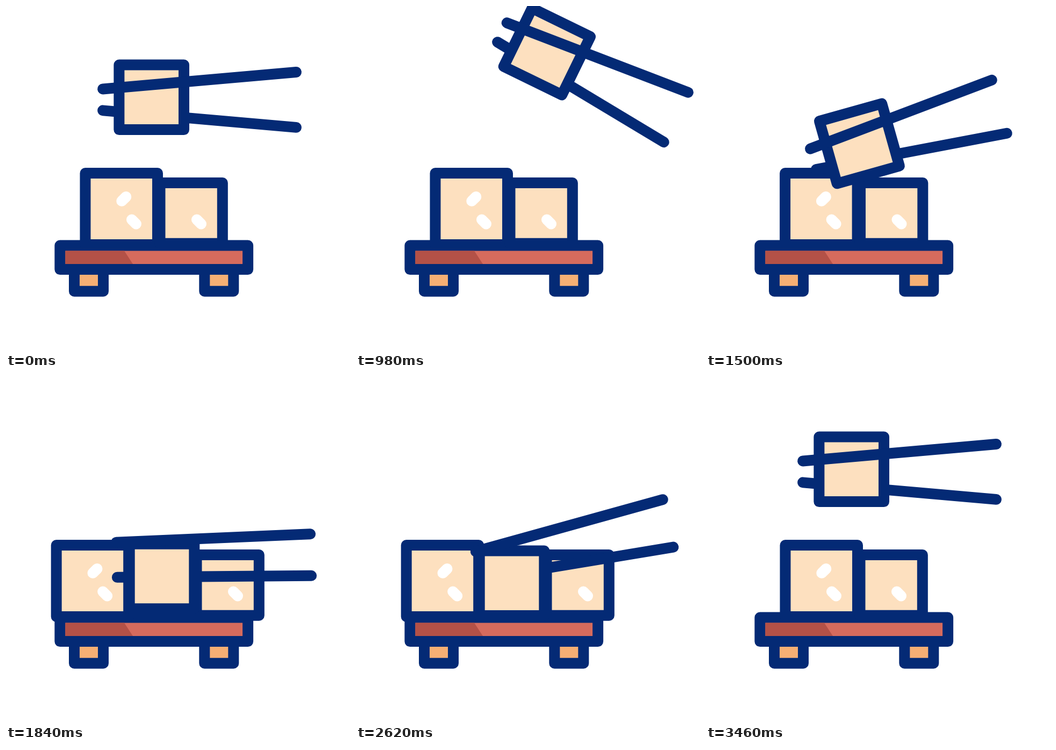
Recreate the animation shown at these times as an HTML page with a canvas. Size 640x640 px, loop 3.6 s.

```html
<!DOCTYPE html>
<html lang="en">
<head>
<meta charset="utf-8">
<title>Tofu and chopsticks</title>
<style>
  html, body { margin: 0; width: 100%; height: 100%; overflow: hidden; background: #fff; }
  canvas { display: block; width: 640px; height: 640px; }
</style>
</head>
<body>
<canvas id="stage" width="640" height="640"></canvas>
<script>
const ctx = document.getElementById('stage').getContext('2d');
const LOOP = 3600;
const NAVY = '#042a75', CREAM = '#fde0bf', RED = '#d66b5d', DARK_RED = '#b45147', ORANGE = '#f6af74';

const rad = deg => deg * Math.PI / 180;
const mix = (a, b, p) => a + (b - a) * p;
const mixPose = (a, b, p) => a.map((v, i) => mix(v, b[i], p));
const progress = (t, from, to) => Math.min(1, Math.max(0, (t - from) / (to - from)));
const ease = (t, from, to) => {
  const u = progress(t, from, to);
  return u * u * (3 - 2 * u);
};

// Key poses of the chopstick pair: centre and tilt.
const path = [
  { at: 0, pose: [360, 174.4, 0] },
  { at: 540, pose: [381, 171.4, 11.2] },
  { at: 980, pose: [433.6, 128.1, 26] },
  { at: 1500, pose: [372.6, 235.8, -15.75] },
  { at: 1740, pose: [378, 360, -8] },
  { at: 2220, pose: [432.4, 129, 25] },
  { at: 2620, pose: [404.5, 308.9, -12.4] },
  { at: 2700, pose: [411, 338, -16] },
  { at: 3060, pose: [378.8, 257.8, -8.5] },
  { at: 3460, pose: [360, 174.4, 0] }
];

// Slope at a key: flat at turning points and ends, smooth in between.
function slope(i, k) {
  const prev = path[i - 1], here = path[i], next = path[i + 1];
  if (!prev || !next) return 0;
  const a = (here.pose[k] - prev.pose[k]) / (here.at - prev.at);
  const b = (next.pose[k] - here.pose[k]) / (next.at - here.at);
  return a * b <= 0 ? 0 : 2 * a * b / (a + b);
}

function sticksPose(t) {
  const end = path.findIndex(key => key.at > t);
  if (end < 0) return path[0].pose;
  const from = path[end - 1], to = path[end];
  const span = to.at - from.at, u = (t - from.at) / span, v = 1 - u;
  return from.pose.map((value, k) =>
    mix(value, to.pose[k], u * u * (3 - 2 * u))
    + span * u * v * (slope(end - 1, k) * v - slope(end, k) * u));
}

const opening = t => 12 * (ease(t, 1740, 2000) - ease(t, 2420, 2690));
const spread = t => ease(t, 1490, 1710) - progress(t, 2960, 3460) ** 2.2;

// Where the cube sits while the chopsticks hold it firmly.
function gripped([x, y, tilt]) {
  const c = Math.cos(rad(tilt)), s = Math.sin(rad(tilt));
  return [x - 89.3 * c + 4.6 * s, y - 89.3 * s - 4.6 * c, tilt];
}

function cubePose(t, sticks) {
  const rest = [290, mix(369, 381.8, ease(t, 2220, 2600)), 0];
  if (t < 1740) return mixPose(gripped(sticks), rest, ease(t, 1500, 1740));
  const lift = ease(t, 2660, 3460);
  const home = gripped(path[0].pose);
  return [
    mix(rest[0], home[0], 1 - (1 - lift) ** 3),
    mix(rest[1], home[1], lift),
    1.4 * Math.sin(Math.PI * lift)
  ];
}

function box(x, y, w, h, fill) {
  ctx.beginPath();
  ctx.rect(x, y, w, h);
  ctx.fillStyle = fill;
  ctx.fill();
  ctx.strokeStyle = NAVY;
  ctx.stroke();
}

function line(x1, y1, x2, y2, color) {
  ctx.beginPath();
  ctx.moveTo(x1, y1);
  ctx.lineTo(x2, y2);
  ctx.strokeStyle = color;
  ctx.stroke();
}

function placed([x, y, angle], draw) {
  ctx.save();
  ctx.translate(x, y);
  ctx.rotate(rad(angle));
  draw();
  ctx.restore();
}

function tray() {
  for (const x of [127, 369.3]) box(x, 490, 54, 40.7, ORANGE);
  box(100.4, 445.5, 349.7, 44.6, RED);
  ctx.beginPath();
  ctx.moveTo(110.4, 455.5);
  ctx.lineTo(220, 455.5);
  ctx.lineTo(236, 480.1);
  ctx.lineTo(110.4, 480.1);
  ctx.fillStyle = DARK_RED;
  ctx.fill();
}

function leftCube() {
  box(147.5, 311, 134.5, 133, CREAM);
  line(215.3, 362.8, 223.3, 355, '#fff');
  line(234, 397.5, 242, 405.5, '#fff');
}

function rightCube() {
  box(286.5, 329, 116.3, 112.8, CREAM);
  line(355, 397.5, 363, 405.5, '#fff');
}

// side: -1 for the upper stick, 1 for the lower one
function stick([x, y, tilt], side, open) {
  const offset = side * 35.7, a = rad(tilt);
  const pose = [x - offset * Math.sin(a), y + offset * Math.cos(a), tilt + side * (5 - open)];
  placed(pose, () => line(-180.6, 0, 180.6, 0, NAVY));
}

function render(t) {
  ctx.fillStyle = '#fff';
  ctx.fillRect(0, 0, 640, 640);
  ctx.lineWidth = 20;
  ctx.lineCap = ctx.lineJoin = 'round';

  const sticks = sticksPose(t), open = opening(t), gap = spread(t);
  tray();
  placed([-53.8 * gap, 0, 0], leftCube);
  placed([68 * gap, 0, 0], rightCube);
  stick(sticks, 1, open);
  placed(cubePose(t, sticks), () => box(-60.3, -60.3, 120.6, 120.6, CREAM));
  stick(sticks, -1, open);
}

const start = performance.now();
function frame(now) {
  render(Math.max(0, now - start) % LOOP);
  requestAnimationFrame(frame);
}
render(0);
requestAnimationFrame(frame);
</script>
</body>
</html>
```
